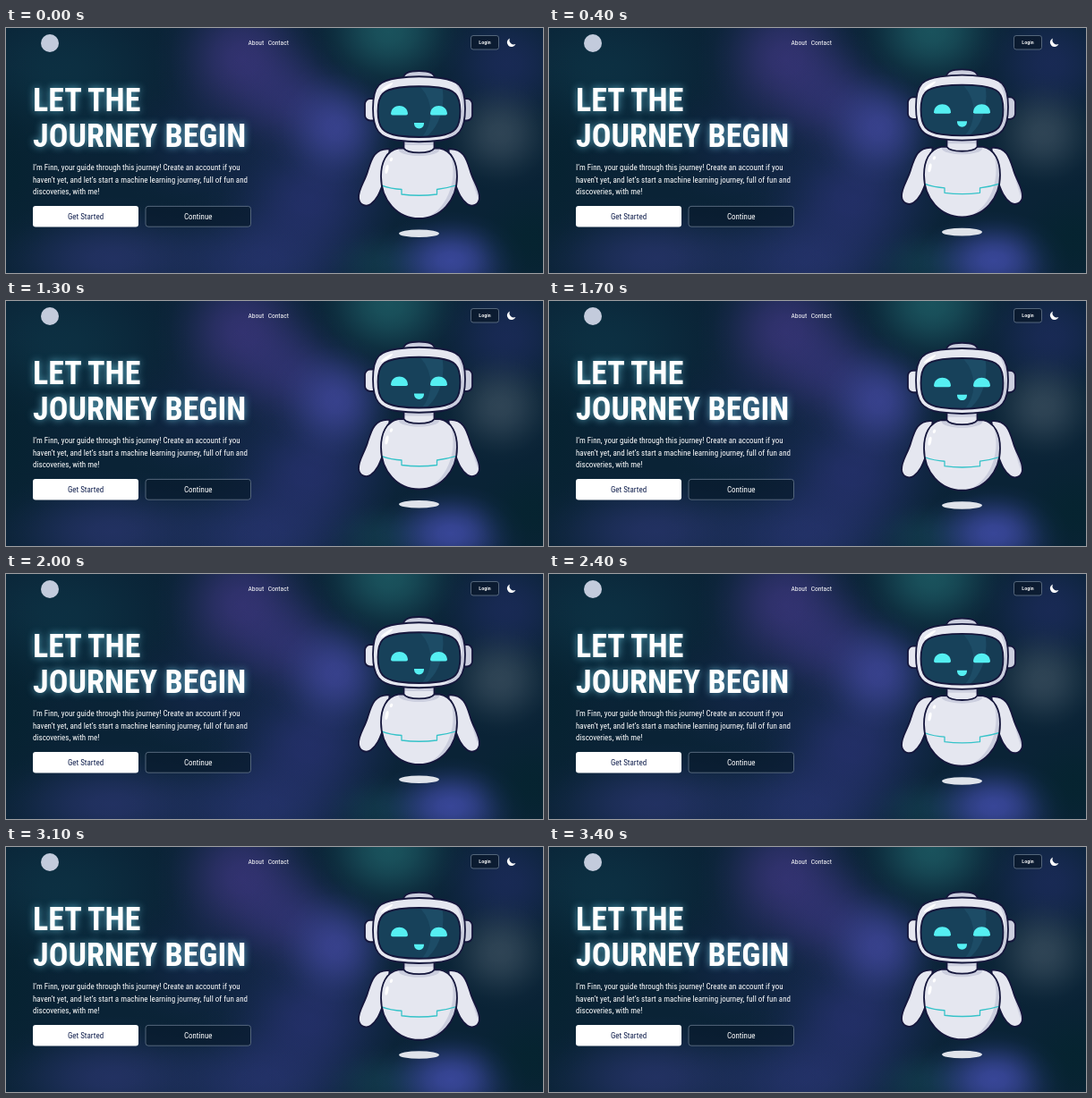
Recreate the animation shown at these times as an HTML page with a canvas. Size 600 by 274 pixels, loop 3.5 s.

```html
<!DOCTYPE html>
<html lang="en">
<head>
<meta charset="utf-8">
<title>Let the journey begin</title>
<style>
html, body { margin: 0; width: 100%; height: 100%; overflow: hidden; background: #0a1f33; }
canvas { display: block; width: 600px; height: 274px; }
</style>
</head>
<body>
<canvas id="stage"></canvas>
<script>
const W = 600, H = 274, LOOP = 3500, STEP = 100;
const canvas = document.getElementById('stage');
const ctx = canvas.getContext('2d');
const dpr = window.devicePixelRatio || 1;
canvas.width = W * dpr;
canvas.height = H * dpr;

const INK = '#15173c', LIGHT = '#e5e7f0', SHADE = '#cbcede', CYAN = '#55eff2', TEAL = '#35c3c9';
const FAMILY = '"Roboto Condensed", Roboto, sans-serif';

// x, y, radius x, radius y, rgb, alpha
const GLOWS = [
  [60, 50, 150, 100, '14,58,76', .55],
  [120, 258, 150, 70, '42,54,112', .75],
  [285, 262, 150, 85, '42,54,118', .75],
  [340, 190, 120, 100, '44,52,122', .7],
  [225, 130, 110, 90, '30,42,92', .4],
  [265, 35, 100, 100, '60,54,126', .8],
  [318, 82, 85, 80, '60,56,134', .6],
  [370, 112, 75, 75, '68,74,164', .75],
  [428, 4, 90, 75, '30,94,102', .8],
  [420, 264, 70, 45, '22,72,88', .5],
  [560, 40, 90, 80, '34,46,104', .6],
  [552, 118, 68, 65, '62,82,98', .7],
  [497, 260, 85, 55, '64,76,168', .85],
  [590, 235, 75, 70, '4,36,46', .7],
  [0, 150, 70, 130, '4,34,46', .6]
];

function glow([x, y, rx, ry, rgb, a]) {
  ctx.save();
  ctx.translate(x, y);
  ctx.scale(rx, ry);
  const g = ctx.createRadialGradient(0, 0, 0, 0, 0, 1);
  for (let i = 0; i <= 6; i++) {
    const r = i / 6;
    g.addColorStop(r, `rgba(${rgb},${a * (1 + Math.cos(Math.PI * r)) / 2})`);
  }
  ctx.fillStyle = g;
  ctx.fillRect(-1, -1, 2, 2);
  ctx.restore();
}

function text(str, x, y, size, weight = 400, color = '#fff', align = 'left') {
  ctx.font = `condensed ${weight} ${size}px ${FAMILY}`;
  ctx.textRendering = 'optimizeLegibility';
  ctx.textAlign = align;
  ctx.fillStyle = color;
  ctx.fillText(str, x, y);
}

function paint(p, fill, stroke, line = 1.8) {
  if (fill) { ctx.fillStyle = fill; ctx.fill(p); }
  if (stroke) { ctx.strokeStyle = stroke; ctx.lineWidth = line; ctx.stroke(p); }
}

function box(x, y, w, h, r, fill, stroke, line) {
  const p = new Path2D();
  p.roundRect(x, y, w, h, r);
  paint(p, fill, stroke, line);
}

function oval(x, y, rx, ry, color, turn = 0) {
  ctx.beginPath();
  ctx.ellipse(x, y, rx, ry, turn, 0, 7);
  ctx.fillStyle = color;
  ctx.fill();
}

// Fills a shape, draws inside it, then outlines it
function shaded(p, fill, inner) {
  ctx.save();
  ctx.clip(p);
  paint(p, fill);
  inner();
  ctx.restore();
  paint(p, null, INK);
}

function page() {
  ctx.fillStyle = '#0a2336';
  ctx.fillRect(0, 0, W, H);
  GLOWS.forEach(glow);

  oval(49, 17, 10, 10, '#c3cbdc');
  text('About', 270.5, 19, 7.5);
  text('Contact', 292.7, 19, 7.5);
  box(519.5, 8.5, 31, 15.5, 2.5, 'rgba(9,24,42,.75)', '#66788c', .8);
  text('Login', 535, 18.3, 6, 500, '#fff', 'center');
  paint(new Path2D('M563 11.4 A5 5 0 1 0 569.4 18 A4.9 4.9 0 0 1 563 11.4 Z'), '#fff');

  ctx.save();
  ctx.shadowColor = 'rgba(120,215,240,.7)';
  ctx.shadowBlur = 8 * dpr;
  text('LET THE', 30, 93.4, 36, 700);
  text('JOURNEY BEGIN', 30, 133, 36, 700);
  ctx.restore();

  [
    'I’m Finn, your guide through this journey! Create an account if you',
    'haven’t yet, and let’s start a machine learning journey, full of fun and',
    'discoveries, with me!'
  ].forEach((s, i) => text(s, 30, 159 + i * 13.5, 9));

  box(30, 199, 118, 23.5, 3, '#fff');
  text('Get Started', 89, 214, 9, 400, '#101f4d', 'center');
  box(156, 199.4, 117.5, 22.8, 3, 'rgba(9,27,46,.75)', '#66788c', .8);
  text('Continue', 214.7, 214, 9, 400, '#fff', 'center');
}

const ARM = new Path2D('M-33 135.5 C-49 134 -53 146 -57 159 C-60 171 -68 180 -67.5 190 C-67 198 -59 200.5 -54 197 C-47 192 -44 184 -41 176 L-34 150 Z');
const BODY = new Path2D('M-23 134.5 C-37 137 -42.5 151 -42.5 166 C-42.5 193 -24 213 0 213 C24 213 42.5 193 42.5 166 C42.5 151 37 137 23 134.5 Z');
const NECK = new Path2D('M-17 124 L-17 134.5 C-13 141 13 141 17 134.5 L17 124 Z');
const CAP = new Path2D('M-18 57 C-17 50 -11 48 0 48 C11 48 17 50 18 57 Z');
const HEAD = new Path2D('M-51.5 90 C-51.5 63 -43 58.5 -24 56 Q0 52.5 24 56 C43 58.5 51.5 63 51.5 90 C51.5 115 44 122.5 25 125.5 Q0 129 -25 125.5 C-44 122.5 -51.5 115 -51.5 90 Z');
const VISOR = new Path2D('M-46 93 C-46 74 -40 69 -22 66.5 Q0 64 22 66.5 C40 69 46 74 46 93 C46 112 40 118 23 120.5 Q0 123.5 -23 120.5 C-40 118 -46 112 -46 93 Z');

function eye(x) {
  paint(new Path2D(`M${x - 9.5} 96 C${x - 9} 84 ${x + 9} 84 ${x + 9.5} 96 Q${x + 9} 97.5 ${x + 7} 97.5 L${x - 7} 97.5 Q${x - 9} 97.5 ${x - 9.5} 96 Z`), CYAN);
}

function robot(dy) {
  ctx.save();
  ctx.translate(461.5, dy);
  ctx.lineJoin = 'round';

  oval(0, 229.8, 22.5, 4.3, '#dfe3ea');

  for (const side of [1, -1]) {
    ctx.save();
    ctx.scale(side, 1);
    shaded(ARM, LIGHT, () => {
      if (side < 0) oval(-69, 178, 7, 36, SHADE, .3);
    });
    ctx.restore();
  }

  shaded(BODY, SHADE, () => {
    oval(-6, 160, 44, 55, LIGHT);
    oval(0, 136, 23, 7, SHADE);
    oval(-36, 158, 1.8, 5, '#fff', .2);
    oval(-31, 147, 1.6, 2.2, '#fff', .5);
    paint(new Path2D('M-43 175.5 Q-31 180 -19.5 180.5 L-19.5 186 Q0 188.5 20 186 L20 180.5 Q32 179 43 175.5'), null, TEAL, 1.3);
  });
  shaded(NECK, LIGHT, () => {
    ctx.fillStyle = SHADE;
    ctx.fillRect(-18, 123, 36, 8);
  });

  box(-60.5, 79, 16, 24.5, 6, LIGHT, INK);
  box(44, 79, 15.5, 24.5, 6, SHADE, INK);
  paint(CAP, SHADE, INK);
  shaded(HEAD, SHADE, () => {
    oval(-9, 86, 57, 50, LIGHT);
    oval(-36, 66, 8, 1.5, '#fff', -.6);
  });
  shaded(VISOR, '#163c54', () => {
    oval(-14, 78, 41, 52, '#1d4c66');
    oval(-24, 95, 37, 40, '#17415a');
  });
  eye(-22);
  eye(22);
  paint(new Path2D('M-5.5 106 L5.5 106 C6 114.5 -6 114.5 -5.5 106 Z'), CYAN);
  ctx.restore();
}

function frame(now) {
  const t = Math.floor((now % LOOP) / STEP) * STEP;
  ctx.setTransform(dpr, 0, 0, dpr, 0, 0);
  page();
  robot(-2.8 * Math.sin(2 * Math.PI * t / 4000));
  requestAnimationFrame(frame);
}
requestAnimationFrame(frame);
</script>
</body>
</html>
```
